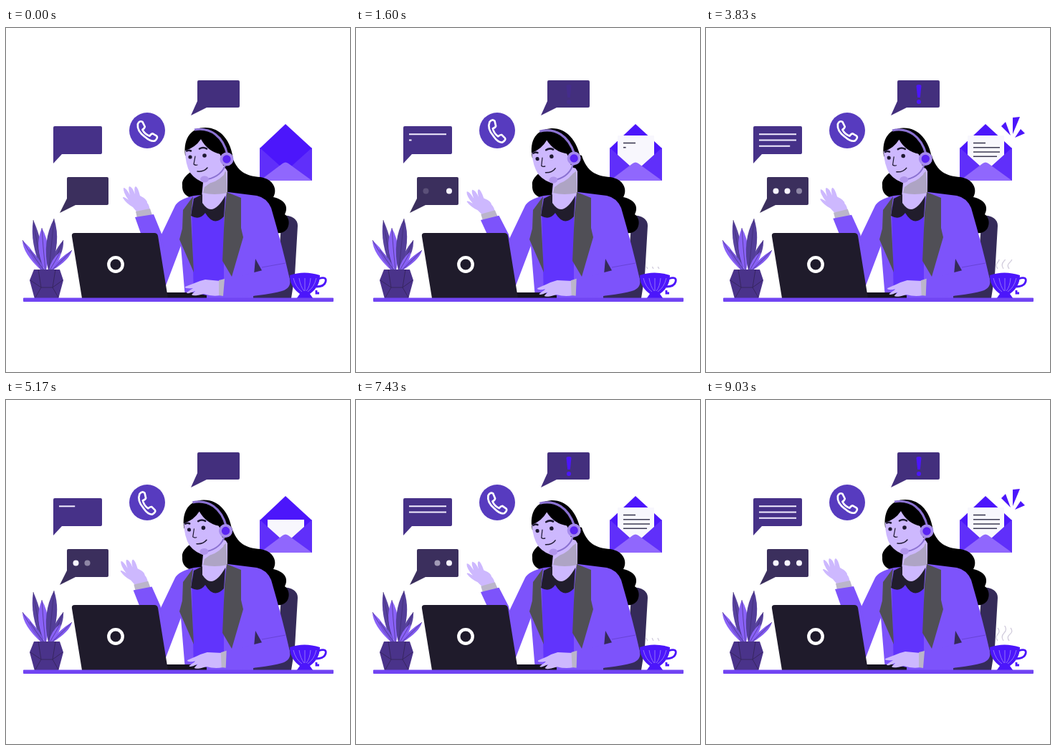
These frames come from a looping animation (480 px wide and 480 px high, 9060 ms). An HTML page:

```html
<!DOCTYPE html>
<html lang="en">
<head>
<meta charset="utf-8">
<title>Support desk</title>
<style>
  html, body { margin: 0; width: 100%; height: 100%; overflow: hidden; background: #fff; }
  svg { display: block; width: 100%; height: 100%; }
  .jacket { fill: #7d53fb; }
  .skin { fill: #cdb8fe; }
  .dark { fill: #352b59; }
  .grey { fill: #504f56; }
  .vivid { fill: #4c16fb; }
  .ink { fill: none; stroke: #1d1830; stroke-linecap: round; }
  .paper-line { fill: none; stroke: #3d3a52; stroke-width: 1.6; }
  .chat-line { fill: none; stroke: #f2edff; stroke-width: 2; }
</style>
</head>
<body>
<svg viewBox="0 0 480 480" xmlns="http://www.w3.org/2000/svg">
  <defs>
    <clipPath id="envelopeMask"><path d="M354 134H427V213H354Z"/></clipPath>
    <clipPath id="steamMask"><rect id="steamWindow" x="400" width="30" height="24"/></clipPath>
  </defs>

  <!-- speech bubbles -->
  <path fill="#432f7d" d="M269 73H324Q326 73 326 75V109Q326 111 324 111H280L258 122L267 102V75Q267 73 269 73Z"/>
  <g id="alert" class="vivid">
    <path d="M293.5 81Q293.5 79 297 79T300.5 81L298.8 97H295.2Z"/>
    <circle cx="297" cy="103" r="3"/>
  </g>
  <path fill="#463188" d="M68 137H132Q134 137 134 139V174Q134 176 132 176H78L66 189V139Q66 137 68 137Z"/>
  <g id="chatLines"></g>
  <path fill="#3b2f5d" d="M87 208H141Q143 208 143 210V245Q143 247 141 247H97L75 258L85 238V210Q85 208 87 208Z"/>
  <g id="dots" fill="#f7f4ff"></g>

  <!-- phone -->
  <circle cx="197" cy="143" r="25" fill="#573bbf"/>
  <path id="handset" fill="none" stroke="#fff" stroke-width="2.4" stroke-linejoin="round"
    d="M-12-8Q-10-13-6-11L-3-5Q-3-3-6-1Q-3 5 3 7Q5 4 7 4L12 7Q14 9 10 13Q5 15-3 8Q-13 1-12-8Z"/>

  <!-- envelope -->
  <path class="vivid" d="M354 168L390 134L427 168V213H354Z"/>
  <g clip-path="url(#envelopeMask)">
    <g id="letter">
      <rect x="365" y="150" width="51" height="55" fill="#f8f7fd"/>
      <g id="letterLines"></g>
    </g>
  </g>
  <path fill="#602ffa" d="M354 167L383 193L390 188L398 193L427 167V213H354Z"/>
  <path fill="#9067fd" d="M354 213L386 189Q390 186 394 189L427 213Z"/>
  <g id="burst" class="vivid">
    <path d="M412 137L418 131L425 150Z"/>
    <path d="M428 125L438 124L428 148Z"/>
    <path d="M439 141L445 147L431 153Z"/>
  </g>

  <!-- chair and loose hair -->
  <path class="dark" d="M385 261Q407 262 407 276L403 345L398 377H345V371L380 330Z"/>
  <path d="M262 198Q244 209 246 220Q245 234 262 238L318 240L378 286C396 288 399 267 389 260C394 251 391 240 373 236C379 226 374 211 355 208C335 207 322 200 315 178L290 170Z"/>

  <!-- torso -->
  <path class="jacket" d="M262 234L310 229L350 234Q364 237 370 251Q386 306 396 351L345 374V377H250L244 304L222 362L205 377L214 294L236 248Q241 239 262 234Z"/>
  <path fill="#6134fc" d="M259 250L304 240L304 360L262 377Z"/>
  <path class="skin" d="M276 205L302 188L309 200V229L303 243Q289 267 272 246Z"/>
  <path fill="#aea4c4" d="M277 222L307 200L309 230Q290 234 275 230Z"/>
  <path fill="#211d2c" d="M274 232L262 238L258 262Q270 269 278 258Q290 278 304 263L306 234Q288 266 274 244Z"/>
  <path class="grey" d="M261 235L247 254L246 280L242 295L262 341L258 262Z"/>
  <path class="grey" d="M308 229L328 237V279L331 292L315 347L302 325L305 258Z"/>
  <path class="dark" d="M348 322L358 340L346 344Z"/>
  <path fill="none" stroke="#6843d6" d="M357 334L390 328"/>
  <path class="jacket" d="M304 352L358 338L390 329L396 352Q398 363 385 367Q360 374 303 377Z"/>

  <!-- raised forearm -->
  <g id="forearm">
    <path class="skin" d="M182 256L177 250Q168 245 163 237Q163 234 171 240Q163 229 164 223Q167 222 173 233Q170 223 172 221Q176 221 180 232Q178 222 181 221Q184 222 187 234Q197 239 197 244Q200 247 201 255Z"/>
    <path fill="#bbb5ca" d="M181 256L201 252L204 261L183 265Z"/>
    <path class="jacket" d="M180 264L206 260L217 287L222 320V340H207Z"/>
  </g>

  <!-- head -->
  <g id="head">
    <path d="M250 178C247 152 260 139 278 139C300 139 314 158 317 183L313 198L300 194L280 180Z"/>
    <path class="skin" d="M250 171Q264 167 272 155Q281 172 299 176Q309 195 304 205Q293 216 280 217Q265 213 257 202Q250 190 250 171Z"/>
    <path d="M272 153Q290 158 300 179L303 192L314 190Q313 150 278 142Z"/>
    <path fill="none" stroke="#8b72d2" stroke-width="3.2" d="M263 142C285 138 303 151 309 177"/>
    <path class="ink" stroke-width="2.6" d="M252 171.5Q255 170 258 171.5M270 168.5Q275 165.5 280 168.5"/>
    <circle cx="257" cy="180" r="2.6" fill="#1d1830"/>
    <circle cx="277" cy="178" r="2.8" fill="#1d1830"/>
    <path class="ink" stroke-width="1.2" d="M264 179L262 190Q264 192 267 191"/>
    <path class="ink" stroke-width="1.5" d="M267 200Q276 201 281 195"/>
    <path fill="none" stroke="#8b72d2" stroke-width="2" d="M307 189Q301 207 281 211"/>
    <ellipse cx="277" cy="211" rx="6" ry="4.5" fill="#b196ec"/>
    <circle cx="308" cy="183" r="9.5" fill="#a68bed"/>
    <circle cx="308" cy="183" r="5.7" fill="#5b25f2"/>
  </g>

  <!-- laptop -->
  <path fill="#16131f" d="M222 369H262L280 373V377H222Z"/>
  <path fill="#1f1b2b" d="M96 286H207Q211 286 212 290L226 377H106L92 291Q91 286 96 286Z"/>
  <circle cx="153" cy="330" r="9.7" fill="none" stroke="#fff" stroke-width="4.4"/>

  <!-- typing hand -->
  <g id="typing">
    <path class="skin" d="M299 353L278 351Q269 353 263 356L250 361Q248 364 261 363L252 369Q252 372 264 367L259 372Q261 375 276 371Q288 375 299 373Z"/>
    <path fill="#bbb5ca" d="M297 352L305 350L303 374L297 373Z"/>
  </g>

  <!-- plant -->
  <g id="leaves"></g>
  <path fill="#4a338a" d="M39 337H75L80 352L73 378H40L33 352Z"/>
  <path fill="none" stroke="#37265f" d="M45 337L49 362L41 376M69 337L65 362L73 376M49 362H65M34 352L49 362M79 352L65 362"/>

  <!-- cup -->
  <g clip-path="url(#steamMask)" fill="none" stroke="#d2cddd" stroke-width="1.3">
    <path d="M407 336Q403 331 407 327T407 318"/>
    <path d="M415 336Q411 330 416 325T416 314"/>
    <path d="M423 336Q419 331 424 327T425 318"/>
  </g>
  <path class="vivid" d="M396 345Q416 338 438 345Q438 361 424 371L429 378H405L410 371Q396 361 396 345Z"/>
  <path fill="none" stroke="#4c16fb" stroke-width="2.8" d="M436 350Q448 346 446 354Q444 361 433 361M433 366V370H437"/>
  <path fill="none" stroke="#9272f8" d="M401 349Q404 362 413 368M409 349Q411 361 416 367M417 349V367M425 349Q424 361 419 367M433 349Q430 362 421 368"/>

  <rect x="24" y="376.5" width="433" height="5.5" rx="1" fill="#7144f3"/>
</svg>

<script>
const CYCLE = 4530;
const byId = id => document.getElementById(id);

function add(parent, tag, attrs) {
  const node = document.createElementNS("http://www.w3.org/2000/svg", tag);
  for (const key in attrs) node.setAttribute(key, attrs[key]);
  return byId(parent).appendChild(node);
}

const linear = x => x;
const smooth = x => (1 - Math.cos(Math.PI * x)) / 2;

// Interpolates a table of [time, value] steps.
function track(steps, t, ease = linear) {
  if (t <= steps[0][0]) return steps[0][1];
  for (let i = 1; i < steps.length; i++) {
    const [t0, v0] = steps[i - 1], [t1, v1] = steps[i];
    if (t < t1) return v0 + (v1 - v0) * ease((t - t0) / (t1 - t0));
  }
  return steps[steps.length - 1][1];
}
const ramp = (start, end, t) => track([[start, 0], [end, 1]], t);

// Lines drawn from left to right: x, y, full length, start, end
function makeLines(parent, className, rows) {
  return rows.map(([x, y, length, start, end]) =>
    ({ node: add(parent, "path", { class: className }), x, y, length, start, end }));
}
const lines = [
  ...makeLines("chatLines", "chat-line", [
    [74, 148.3, 52, 0, 1500], [74, 156.5, 52, 1510, 2850], [74, 164.7, 52, 3000, 4000]]),
  ...makeLines("letterLines", "paper-line", [
    [373, 160.5, 17, 1150, 1520], [373, 166.7, 37, 1560, 1980],
    [373, 173, 37, 1980, 2400], [373, 179.3, 33, 2400, 2800]])
];

// Fade starts alternate between in and out.
const dots = [
  [97.5, [300, 1000, 1570, 2450, 3100]],
  [113.5, [560, 1200, 1900, 2820, 3380]],
  [130, [850, 1650, 2200, 3020, 3750]]
].map(([cx, fades]) => ({
  node: add("dots", "circle", { cx, cy: 227.5, r: 4 }),
  steps: fades.flatMap((start, i) => [[start, i % 2], [start + 180, (i + 1) % 2]])
}));

// Leaves: base x, tip x, tip y, control offset, colour
[
  [50, 38, 268, 10, "#58429f"], [61, 80, 296, 9, "#58429f"],
  [49, 23, 296, 10, "#8a62f7"], [63, 92, 310, 9, "#7e58ed"],
  [54, 50, 279, 13, "#8a62f7"], [59, 67, 266, 14, "#533e99"],
  [52, 33, 309, 8, "#7654dc"], [60, 76, 312, 8, "#8a62f7"]
].forEach(([x, tipX, tipY, bulge, fill]) => {
  const midX = x + (tipX - x) * 0.6, midY = 338 + (tipY - 338) * 0.55;
  add("leaves", "path", {
    fill, d: `M${x} 338Q${midX - bulge} ${midY} ${tipX} ${tipY}Q${midX + bulge} ${midY} ${x + 2} 338Z`
  });
  add("leaves", "path", {
    fill: "none", stroke: "#39276c", "stroke-width": 0.6, d: `M${x + 1} 338Q${midX} ${midY} ${tipX} ${tipY}`
  });
});

const LEAN = [[0, 0], [1510, 1], [3020, 1], [CYCLE, 0]];
const RING = [[0, 0], [500, 14], [800, 14], [1100, 0], [1500, 14], [1700, 14], [2200, 0], [2900, 4], [3400, 0]];
const TYPE = [[0, 0], [640, 4], [1100, 5], [1600, 4], [2250, 2], [2900, 5], [3830, 4], [CYCLE - 30, 0]];
const STEAM = [[900, 0], [1540, 4], [2900, 5], [3830, 14], [4500, 22]];
const LETTER = [[0, 45], [640, 17], [1100, 0]];

const transform = (id, value) => byId(id).setAttribute("transform", value);
const scaleAt = (x, y, s) => `translate(${x} ${y}) scale(${s}) translate(${-x} ${-y})`;

function draw(t) {
  const lean = track(LEAN, t, smooth);
  transform("head", `rotate(${-4.2 * lean} 291 235)`);
  transform("forearm", `rotate(${-5 * lean} 222 335)`);
  transform("handset", `translate(197 143) scale(1.1) rotate(${track(RING, t, smooth)})`);

  const reach = track(TYPE, t, smooth);
  transform("typing", `rotate(${-reach * 0.6} 303 362) translate(${reach * 0.8} 0)`);
  transform("letter", `translate(0 ${track(LETTER, t)})`);
  transform("burst", scaleAt(424, 157, ramp(3250, 3600, t)));
  byId("alert").setAttribute("opacity", ramp(1570, 1850, t));
  byId("steamWindow").setAttribute("y", 337 - track(STEAM, t));

  for (const { node, x, y, length, start, end } of lines)
    node.setAttribute("d", `M${x} ${y}h${length * ramp(start, end, t)}`);
  for (const { node, steps } of dots)
    node.setAttribute("opacity", track(steps, t));
}

const began = performance.now();
function tick() {
  draw((performance.now() - began) % CYCLE);
  requestAnimationFrame(tick);
}
tick();
</script>
</body>
</html>
```
